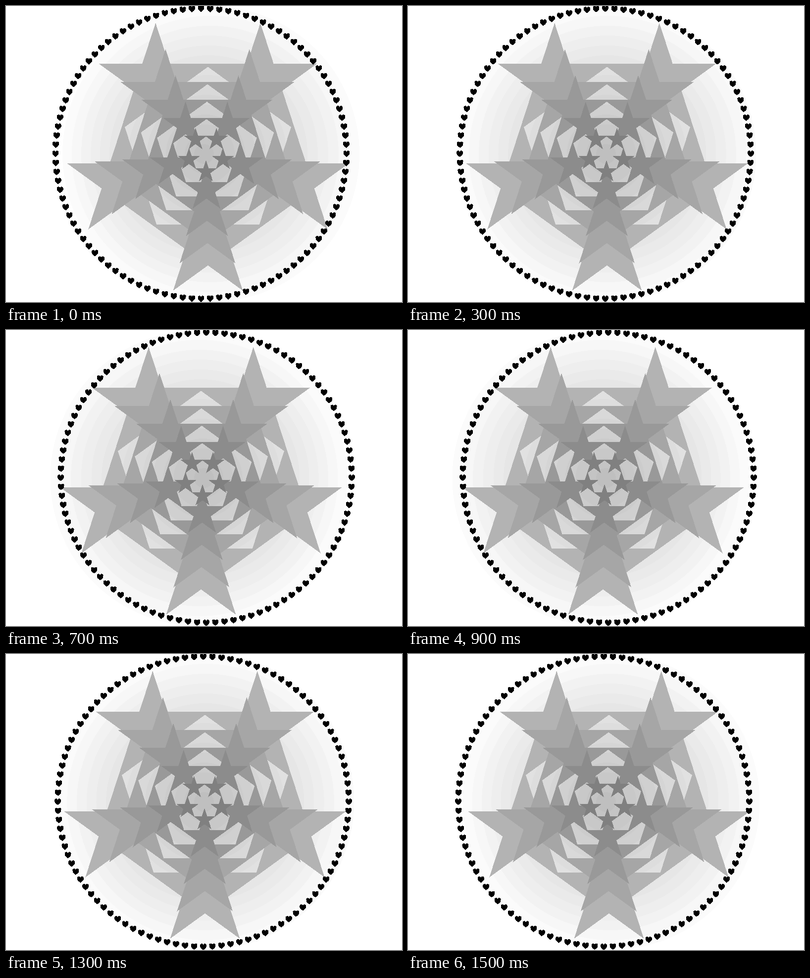
Animation, 800 px wide and 600 px high, one loop 1.6 s. Source, as an HTML page:

```html
<!DOCTYPE html>
<html lang="en">
<head>
<meta charset="utf-8">
<title>Parallax stars</title>
<style>
  html, body { margin: 0; width: 100%; height: 100%; overflow: hidden; background: #fff; }
  svg { display: block; width: 800px; height: 600px; }
</style>
</head>
<body>
<svg id="stage" viewBox="0 0 800 600" shape-rendering="crispEdges"></svg>
<script>
const CX = 400, CY = 300, STEP = 100, STEPS = 16;
const stage = document.getElementById('stage');
const layers = [];

const grey = v => {
  const c = Math.round(v * 255);
  return `rgb(${c},${c},${c})`;
};

// A point at a clockwise angle (degrees) from straight up.
const polar = (r, deg, x = 0, y = 0) => {
  const a = deg * Math.PI / 180;
  return [x + r * Math.sin(a), y - r * Math.cos(a)];
};

// Each layer swings sideways by its own depth.
function addLayer(d, fill, depth) {
  const el = document.createElementNS('http://www.w3.org/2000/svg', 'path');
  el.setAttribute('d', d);
  el.setAttribute('fill', fill);
  stage.append(el);
  layers.push({ el, depth });
}

const disc = r => `M${-r} 0A${r} ${r} 0 1 1 ${r} 0A${r} ${r} 0 1 1 ${-r} 0Z`;

function star(x, y, r) {
  const inner = r * 0.381966;
  const pts = Array.from({ length: 10 }, (_, i) =>
    polar(i % 2 ? inner : r, i * 36, x, y).map(n => n.toFixed(2)).join(' '));
  return `M${pts.join('L')}Z`;
}

const heart = (x, y) =>
  `M${x.toFixed(2)} ${y.toFixed(2)}m0 6.2l-4.4 -3.6l-1.9 -2.6v-2.8` +
  'a3.2 3.2 0 0 1 6.3 -1.6a3.2 3.2 0 0 1 6.3 1.6v2.8l-1.9 2.6z';

const ring = (count, radius, start, shape) =>
  Array.from({ length: count }, (_, i) =>
    shape(...polar(radius, start + i * 360 / count))).join('');

for (let i = 14; i >= 0; i--) {
  addLayer(disc(20 * (i + 1)), grey(0.75 + 0.25 * i / 15), i);
}
for (let k = 5; k >= 1; k--) {
  addLayer(ring(5, 36 * k, 36, (x, y) => star(x, y, 24 * k)),
    grey(0.45 + 0.05 * k), k + 3);
}
addLayer(ring(100, 294, 0, heart), '#000', -6);

let shown = -1;
function draw(now) {
  const n = Math.floor(now / STEP) % STEPS;
  if (n !== shown) {
    shown = n;
    const swing = Math.abs(n - 8) / 4 - 1;
    for (const { el, depth } of layers) {
      el.setAttribute('transform', `translate(${CX + swing * depth} ${CY})`);
    }
  }
}

const begin = performance.now();
function tick() {
  draw(performance.now() - begin);
  requestAnimationFrame(tick);
}
tick();
</script>
</body>
</html>
```
